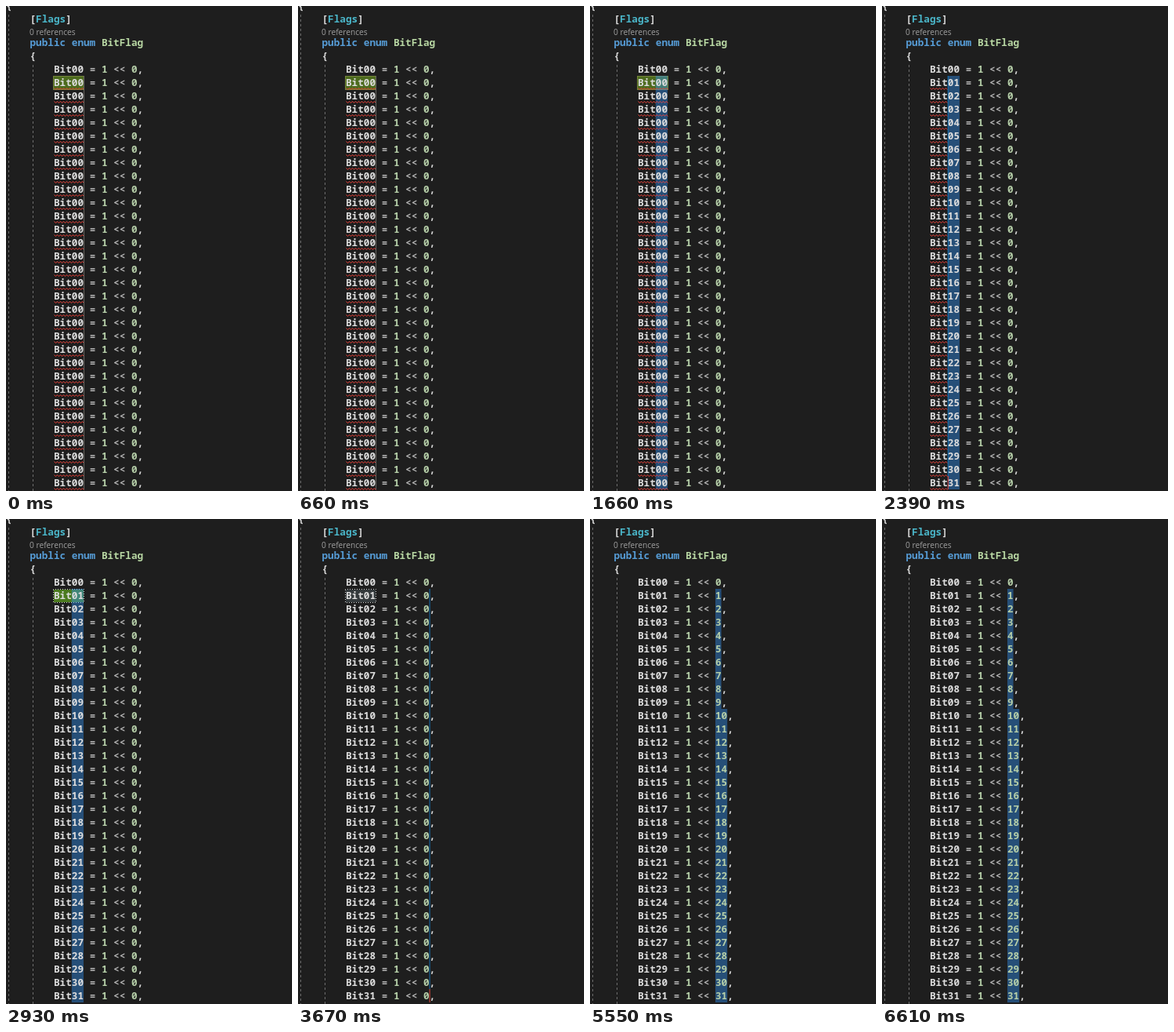
An HTML page with a canvas for the animation above (6810 ms loop, 365 by 618 pixels).

```html
<!DOCTYPE html>
<html lang="en">
<head>
<meta charset="utf-8">
<title>Column editing</title>
<style>
  html, body { margin: 0; height: 100%; overflow: hidden; background: #1e1e1e; }
  canvas { display: block; }
</style>
</head>
<body>
<canvas id="stage" width="365" height="618"></canvas>
<script>
const ctx = document.getElementById('stage').getContext('2d');
const LOOP = 6810, CHAR = 7.617, LINE = 17, LEFT = 60.95, ROWS = 32;
const CODE_FONT = '600 12.695px "Noto Sans Mono", monospace';
const NOTE_FONT = '10.2px "Open Sans", sans-serif';
const PLAIN = '#dcdcdc', OPERATOR = '#b4b4b4', NUMBER = '#b5cea8';
const BOX_CARET = '#6b6864', CARET = '#1570b0', MAIN_CARET = '#e0493e';

// from: start time, caret: column, select: first selected column or none
const steps = [
  { from: 0, caret: 5 },
  { from: 130 },
  { from: 660, caret: 5 },
  { from: 790, caret: 4, select: 4 },
  { from: 1120, caret: 3, select: 3 },
  { from: 1660, select: 3 },
  { from: 2390, caret: 3, select: 3 },
  { from: 2930, select: 3 },
  { from: 3280, caret: 15 },
  { from: 3670, caret: 14 },
  { from: 4070, caret: 13, select: 13 },
  { from: 4620, select: 13 },
  { from: 5020, caret: 13, select: 13 },
  { from: 5550, select: 13 },
  { from: 6080, caret: 13, select: 13 },
  { from: 6610, select: 13 }
];

const colX = col => LEFT + col * CHAR;
const rowTop = row => 72 + row * LINE;

function text(str, col, baseline, color) {
  ctx.fillStyle = color;
  ctx.fillText(str, colX(col), baseline);
}

function box(x, y, w, h, color) {
  ctx.fillStyle = color;
  ctx.fillRect(x, y, w, h);
}

function guide(x, top) {
  ctx.strokeStyle = '#6e6e6e';
  ctx.setLineDash([3, 3]);
  ctx.beginPath();
  ctx.moveTo(x + 0.5, top);
  ctx.lineTo(x + 0.5, 618);
  ctx.stroke();
  ctx.setLineDash([]);
}

function squiggle(row, endCol) {
  const y = rowTop(row) + 15, end = colX(endCol);
  ctx.strokeStyle = '#f03e36';
  ctx.beginPath();
  for (let x = 61, i = 0; x <= end; x += 2, i++) ctx.lineTo(x + 0.5, y + (i % 2 ? 2.5 : 0.5));
  ctx.stroke();
}

function tag(fill, border, dash) {
  box(61, 90, 38, 16, fill);
  ctx.strokeStyle = border;
  ctx.setLineDash(dash);
  ctx.lineDashOffset = 0.5;
  ctx.strokeRect(60.5, 89.5, 39, 17);
  ctx.setLineDash([]);
  ctx.lineDashOffset = 0;
}

function drawHeader() {
  guide(3, 11);
  guide(34, 75);
  ctx.font = NOTE_FONT;
  ctx.fillStyle = '#a0a0a0';
  ctx.fillText('0 references', 30, 37);
  ctx.font = CODE_FONT;
  text('{', -8, 4, PLAIN);
  text('[', -4, 21, PLAIN);
  text('Flags', -3, 21, '#4ab5c8');
  text(']', 2, 21, PLAIN);
  text('public enum', -4, 51, '#569cd6');
  text('BitFlag', 8, 51, '#b8d7a3');
  text('{', -4, 68, PLAIN);
}

function drawRow(row, t, step) {
  const name = 'Bit' + String(t < 2390 ? 0 : row).padStart(2, '0');
  const shift = String(t < 5020 ? 0 : row);
  const top = rowTop(row), baseline = top + 13;

  if (row && step.select) {
    const end = step.select < 13 ? 5 : 13 + shift.length;
    box(colX(step.select), top, (end - step.select) * CHAR, LINE, 'rgba(51,153,255,.4)');
  }
  text(name, 0, baseline, PLAIN);
  text('=', 6, baseline, OPERATOR);
  text('1', 8, baseline, NUMBER);
  text('<<', 10, baseline, OPERATOR);
  text(shift, 13, baseline, NUMBER);
  text(',', 13 + shift.length, baseline, PLAIN);

  if (row && t < 2730) squiggle(row, t < 2390 ? 5 : 3);
  if (row && step.caret) {
    const color = t < 790 ? BOX_CARET : row === ROWS - 1 ? MAIN_CARET : CARET;
    box(colX(step.caret), top, 1, LINE, color);
  }
}

function draw(t) {
  const step = steps.findLast(s => s.from <= t);
  box(0, 0, 365, 618, '#1e1e1e');
  ctx.lineWidth = 1;
  if (t < 2390) tag('#4d6b1e', '#74843c', []);
  else if (t >= 2930 && t < 3340) tag('#4b7a1f', '#d0d0d0', [1, 2]);
  else if (t >= 3340 && t < 5020) tag('#343a3c', '#d0d0d0', [1, 2]);
  drawHeader();
  for (let row = 0; row < ROWS; row++) drawRow(row, t, step);
}

const start = performance.now();
function tick() {
  draw((performance.now() - start) % LOOP);
  requestAnimationFrame(tick);
}
tick();
</script>
</body>
</html>
```
